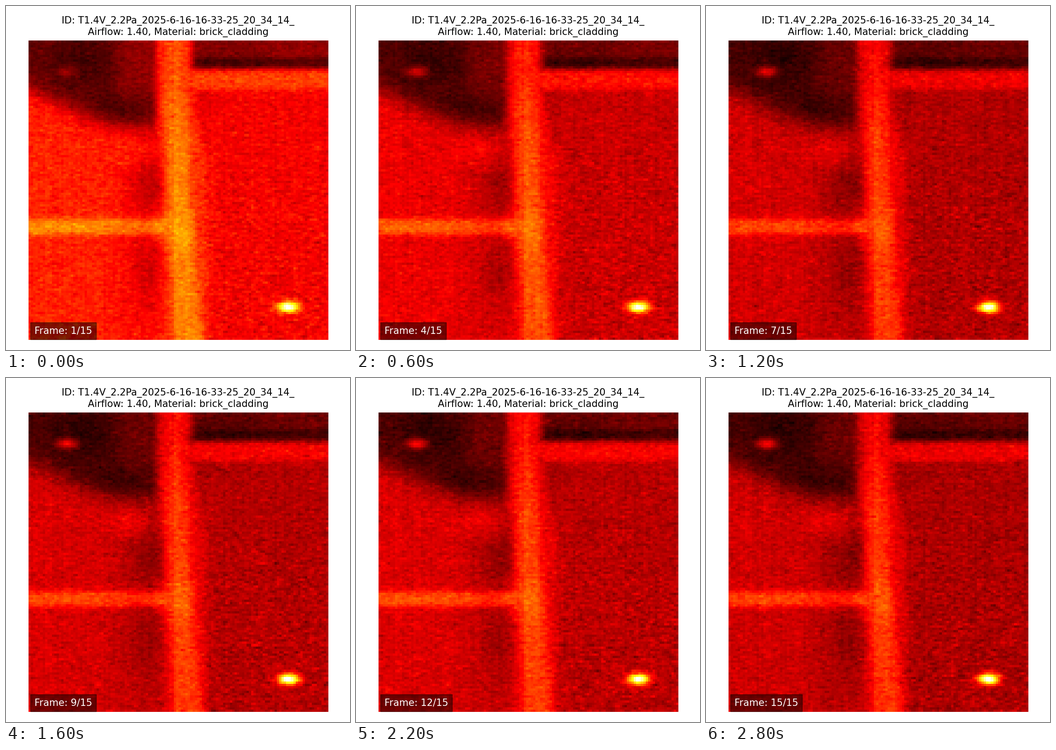
Animation of 748x748 px, one loop 3000 ms. Source, as a matplotlib script:

```python
import numpy as np
import matplotlib.pyplot as plt
from matplotlib.animation import FuncAnimation

STAGE, SIDE, LEFT, TOP = 748, 651, 49, 75
FRAMES, N = 15, 128

plt.rcParams["font.family"] = "DejaVu Sans"
plt.rcParams["font.size"] = 15

cells = (np.arange(N) + 0.5) * SIDE / N
X, Y = np.meshgrid(LEFT + cells, TOP + cells)


def step(v, edge, soft):
    """Smooth rise from 0 to 1 around an edge."""
    return 1 / (1 + np.exp(-np.clip((v - edge) / soft, -40, 40)))


def band(v, a, b, soft):
    return step(v, a, soft) * step(-v, -b, soft)


def blob(cx, cy, sx, sy):
    return np.exp(-((X - cx) / sx) ** 2 / 2 - ((Y - cy) / sy) ** 2 / 2)


def mix(base, value, mask):
    return base + (value - base) * mask


def grain(rng):
    """Noise stretched a little along the rows."""
    a = rng.standard_normal((N, N))
    return (a + 0.75 * np.roll(a, 1, 1)) / 1.25


def left_wall():
    wall = 0.41 - 0.03 * step(X, 240, 25)
    wall = wall - 0.11 * blob(315, 390, 32, 45) - 0.08 * blob(312, 570, 32, 65)
    shade = 0.135 + 0.07 * band(X, 240, 330, 10)
    shade = shade - 0.10 * blob(270, 230, 45, 26) - 0.05 * blob(165, 120, 50, 40)
    edge = 180 + 90 * np.sin(np.pi / 2 * (X - LEFT) / 280)
    wall = mix(shade, wall, step(Y, edge, 13))
    strip = 0.575 - 0.07 * step(X, 255, 25)
    return mix(wall, strip, band(Y, 463, 497, 3.5))


def right_wall():
    shade = 0.18 + 0.03 * step(X, 560, 20)
    shade = shade - 0.10 * band(Y, 112, 136, 3)
    wall = mix(shade, 0.355 - 0.03 * blob(440, 205, 35, 18), step(Y, 138, 3))
    return mix(wall, 0.46, band(Y, 142, 181, 3.5))


def column(wall):
    """Warm vertical joint: a soft halo around a hotter, slanted core."""
    t = (Y - TOP) / SIDE
    halo_left = 327 + 15 * step(Y, 290, 12)
    halo_right = 402 + 36 * step(Y, 270, 25)
    wall = mix(wall, np.maximum(wall, 0.435), band(X, halo_left, halo_right, 5))
    wall = wall + 0.09 * blob(342, 485, 16, 26)
    a, b = 335 + 24 * t, 398 + 32 * t ** 2
    heat = 0.47 + 0.09 * step(Y, 200, 35) + 0.05 * np.exp(-((Y - 490) / 45) ** 2)
    heat = heat - 0.06 * ((2 * X - a - b) / (b - a)) ** 2
    return mix(wall, heat, band(X, a, b, 5))


field = column(np.where(X < 368, left_wall(), right_wall()))
damp = np.clip(field / 0.37, 0.3, 1)
rng0 = np.random.default_rng(7)
fixed = 0.012 * grain(rng0) + 0.007 * rng0.standard_normal(N)
rough = 0.02 + 0.01 * step(X, 430, 15) * step(Y, 370, 40)


def heat_map(i):
    rng = np.random.default_rng(100 + i)
    wobble = 0.012 * np.cos(np.pi * (i - 6) / 4)
    cool = (0.106 * (1 - np.exp(-i / 2.2)) + wobble) * (i > 0)
    glow = 0.12 + 0.2 * (1 - np.exp(-i / 4))
    v = field - cool * damp
    v = v + (fixed + rough * grain(rng)) * (0.55 + 0.45 * damp)
    v += glow * blob(133, 143, 16, 8)
    v += (0.03 + 0.4 * cool) * blob(270, 313, 30, 22)
    v += (0.68 + cool) * blob(613, 654.5, 16, 8.5)
    return np.clip(v, 0, 1)


fig = plt.figure(figsize=(STAGE / 100, STAGE / 100), dpi=100, facecolor="white")
ax = fig.add_axes([LEFT / STAGE, 1 - (TOP + SIDE) / STAGE,
                   SIDE / STAGE, SIDE / STAGE])
ax.axis("off")
image = ax.imshow(heat_map(0), cmap="hot", vmin=0, vmax=1,
                  interpolation="nearest", aspect="auto")

TITLE = ["ID: T1.4V_2.2Pa_2025-6-16-16-33-25_20_34_14_",
         "Airflow: 1.40, Material: brick_cladding"]
for line, y in zip(TITLE, (38, 63)):
    fig.text(374.4 / STAGE, 1 - y / STAGE, line, ha="center", va="baseline")

label = fig.text(61.8 / STAGE, 35.5 / STAGE, "", color="white",
                 bbox=dict(facecolor="black", alpha=0.5, pad=6))


def draw(i):
    image.set_data(heat_map(i))
    label.set_text(f"Frame: {i + 1}/{FRAMES}")
    return image, label


anim = FuncAnimation(fig, draw, frames=FRAMES, interval=200,
                     repeat=True, repeat_delay=0)
plt.show()
```
